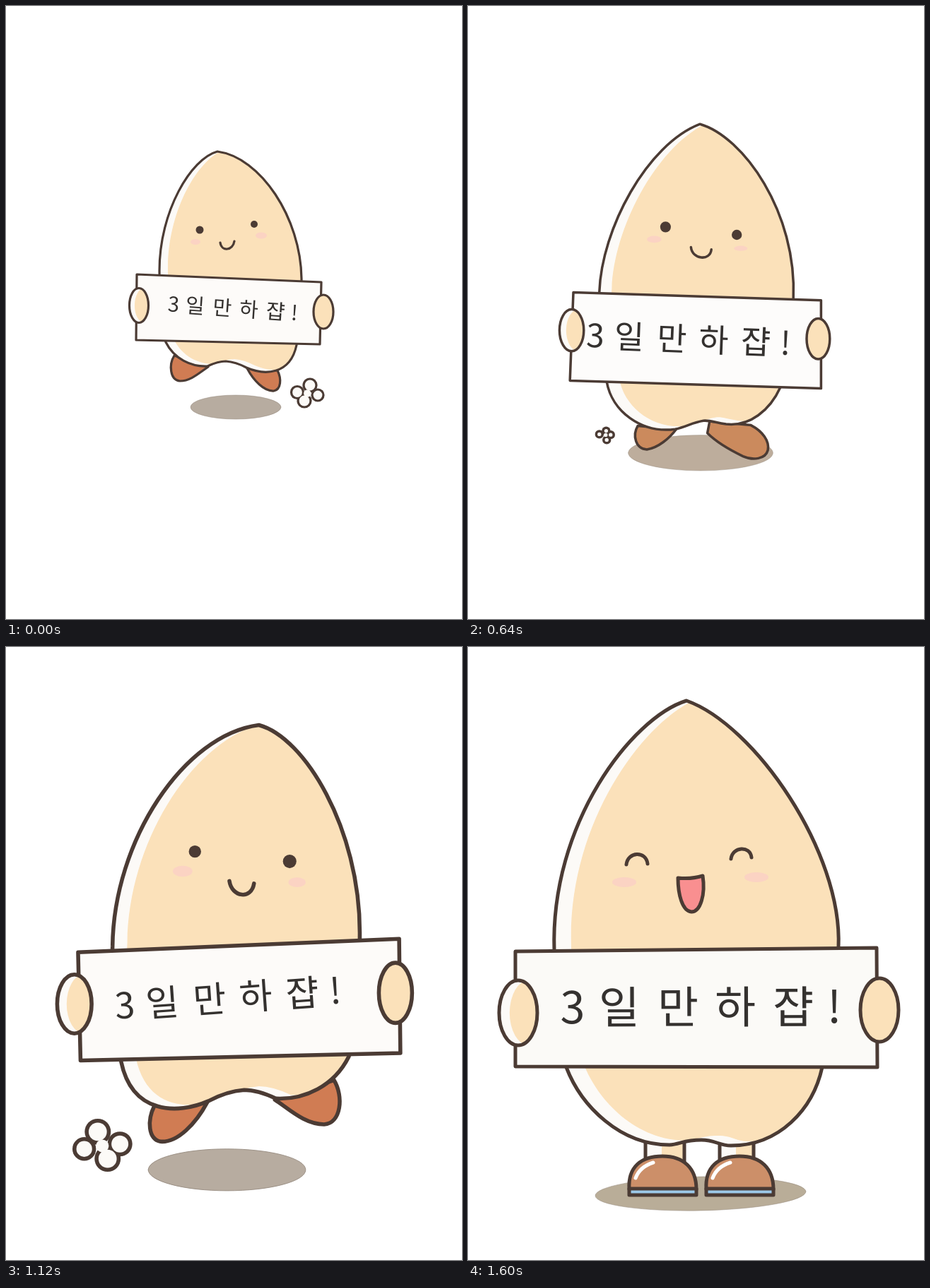
Write an HTML page with a canvas that moves like this. It is 645 px wide and 868 px high and loops after 1920 ms.

```html
<!DOCTYPE html>
<html lang="ko">
<head>
<meta charset="utf-8">
<style>
html, body { margin: 0; width: 100%; height: 100%; overflow: hidden; background: #fff; }
canvas { display: block; }
</style>
</head>
<body>
<canvas id="stage" width="645" height="868"></canvas>
<script>
const ctx = document.getElementById('stage').getContext('2d');
const INK = '#4b3b34', SKIN = '#fbe1ba', SHINE = '#fcfaf7', LOOP = 1920;
const GLYPHS = [['3', 0], ['일', .178], ['만', .403], ['하', .622], ['쟙', .844], ['!', 1]];

// Ellipses: x, y, rx, ry, rotation. Arcs: x1, y1, x2, y2, depth. Text: x1, y1, x2, y2.
const poses = {
  hop: {
    line: 3.2, shine: [12, -3], paper: '#fdfbf9', shade: '#b7aca0', shoe: '#d07c53',
    shadow: [325, 568, 64, 17],
    body: 'M299 206C262 216 217 290 217 375C217 430 222 465 226 476C238 500 262 511 285 510Q300 503 311 503Q325 504 340 512C365 523 402 523 411 480C418 440 419 410 418 386C417 300 360 214 299 206Z',
    feet: ['M238 495C230 508 232 530 246 531C262 531 275 518 286 511Z', 'M341 513C350 530 365 546 379 545C389 543 390 528 384 516Z'],
    sign: 'M185 380L446 391L444 479L184 473Z', text: [237, 422, 408, 434],
    hands: [[188, 424, 13.5, 24.5], [449, 433, 14, 24]],
    eyes: [[274, 317, 5.5], [351, 309, 5]], cheeks: [[268, 334, 7, 4], [361, 325, 8, 4.5]],
    mouth: [303, 335, 323, 333, 10],
    puff: [[430, 537, 9], [441, 551, 8], [422, 559, 9], [412, 547, 8.5]]
  },
  plant: {
    line: 3.2, shine: [13, -4], paper: '#fdfdfc', shade: '#bcad9b', shoe: '#ca8a5c',
    shadow: [302, 590, 94, 19.5],
    body: 'M313 188C262 203 196 290 196 400C196 450 203 492 214 514C228 545 262 560 290 553Q305 542 325 553C350 566 380 566 402 552C416 541 424 522 427 502C435 470 437 430 435 391C428 300 375 207 313 188Z',
    feet: ['M300 550C303 560 301 570 296 573C280 583 260 594 243 599C228 602 228 585 233 573C240 560 260 556 275 553Z', 'M339 562C345 572 358 581 372 585C388 586 396 572 392 560L380 555Z'],
    sign: 'M163 407L465 391L467 499L168 517Z', text: [206, 457, 430, 445],
    hands: [[169, 451, 15.5, 23], [469, 437, 14, 25]],
    eyes: [[265, 323, 6], [353, 314, 6]], cheeks: [[260, 340, 8, 3.5], [364, 329, 8.5, 4]],
    mouth: [297, 344, 321, 340, 11],
    puff: [[424, 558, 3.5], [428, 566, 3.5], [420, 571, 3.5], [415, 565, 3.5]]
  },
  kick: {
    line: 3.5, shine: [20, -6], paper: '#fefaf4', shade: '#b7aea3', shoe: '#c8885d',
    shadow: [302, 634, 91.5, 21.5, .03],
    body: 'M330 177C262 190 192 290 185 405C183 460 188 500 199 527C206 568 246 588 276 567Q296 549 322 557Q336 562 345 572C370 580 420 545 434 515C443 470 445 430 441 391C431 300 388 205 330 177Z',
    feet: ['M247 575C247 600 252 616 262 616C278 614 293 595 294 557Z'],
    sole: 'M343 583C343 556 375 525 405 523C424 522 432 533 429 547C424 577 395 598 368 601C350 602 343 595 343 583Z',
    sign: 'M147 408L469 390L475 509L154 528Z', text: [198, 465, 445, 449],
    hands: [[151, 466, 16.5, 31], [475, 446, 16, 30]],
    lids: [[262, 311, 283, 309, -7], [356, 314, 377, 314, -8]],
    cheeks: [[264, 329, 10, 4.5], [377, 332, 9, 4.5]],
    mouth: [308, 338, 332, 337, 9],
    puff: [[192, 591, 9.5], [207, 596, 7], [201, 608, 8.5]]
  },
  stride: {
    line: 4, shine: [16, -4], paper: '#fdfcfb', shade: '#bfae9b', shoe: '#ca875d',
    shadow: [339, 685, 109, 29, -.03],
    body: 'M309 130C258 143 178 270 175 393C170 460 172 520 184 542C200 570 260 615 292 601Q320 585 345 586Q358 588 370 601C390 619 425 622 446 598C458 583 462 570 465 556C480 500 484 450 481 405C483 300 395 140 309 130Z',
    feet: ['M352 588C352 625 365 661 388 661C403 658 416 638 413 617Z'],
    sole: 'M183 580C182 555 205 545 222 547C255 552 294 590 292 622C290 642 282 647 265 646C225 642 184 608 183 580Z',
    sign: 'M138 392L530 411L517 558L128 536Z', text: [190, 458, 483, 482],
    hands: [[129.5, 459, 20, 34, .14], [526, 481, 21.5, 34.5, .05]],
    eyes: [[257, 303, 9], [374, 292, 8.5]], cheeks: [[245, 326, 9, 4.5], [390, 310, 10, 4.5, -.14]],
    mouth: [305, 332, 332, 331, 11],
    puff: [[489, 635, 10.5], [470, 643, 7.5], [480, 653, 8]]
  },
  land: {
    line: 4.4, shine: [22, -6], paper: '#fdfcfb', shade: '#bdad9c', shoe: '#cb8a5d',
    shadow: [325, 706, 128, 31.5],
    body: 'M326 124C250 146 154 280 161 434C163 500 172 560 184 590C202 630 238 660 280 655C300 652 308 648 320 649C340 652 350 660 370 664C430 672 482 632 491 580C503 530 508 470 504 421C500 310 420 160 326 124Z',
    feet: ['M236 657C215 668 203 685 206 701C210 717 232 720 250 712C275 700 300 684 313 671L309 650Z', 'M368 664C380 680 400 697 420 700C440 699 446 675 436 658Z'],
    sign: 'M112 436L550 422L556 578L112 592Z', text: [175, 511, 511, 498],
    hands: [[117, 504, 20.5, 36], [553, 489, 21.5, 37]],
    eyes: [[261, 320, 9], [387, 306, 9.5]], cheeks: [[254, 344, 12, 4.5], [407, 328, 13, 6]],
    mouth: [306, 346, 342, 342, 16],
    puff: [[492, 667, 5.5], [504, 673, 5.5], [491, 683, 5.5], [484, 674, 5.5]]
  },
  leap: {
    line: 4.6, shine: [23, -6], paper: '#f6fafc', shade: '#bbae9e', shoe: '#ca885d',
    shadow: [306, 752, 130, 35, .07],
    body: 'M347 81C240 100 137 235 137 418C134 490 142 560 158 597C166 652 236 692 280 645C300 634 340 640 362 656C420 660 480 610 498 575C512 520 514 450 510 398C497 290 430 115 347 81Z',
    feet: ['M221 668C222 690 236 716 260 721C280 715 292 675 292 640Z'],
    sole: 'M363 665C364 625 410 588 455 585C485 584 498 605 495 630C490 670 445 705 405 706C375 706 362 690 363 665Z',
    sign: 'M78 423L552 397L562 570L88 599Z', text: [159, 504, 519, 474],
    hands: [[86, 502, 24.5, 41, -.07], [563, 477, 27.5, 41.5]],
    eyes: [[266, 272, 10.5], [403, 285, 10]], cheeks: [[256, 305, 15, 6.5, .14], [413, 314, 13, 6]],
    mouth: [318, 314, 351, 317, 10],
    puff: [[138, 701, 20.5], [167, 710, 12.5], [148, 729, 17.5]]
  },
  stand: {
    line: 5, shine: [24, -6], paper: '#fbfaf7', shade: '#b9ad98', shoe: '#cc8f69',
    shadow: [329, 774, 149, 24, -.02],
    body: 'M309 76C232 100 116 250 122 430C123 500 130 560 139 595C160 650 215 705 285 705C300 704 305 698 330 698C350 698 355 706 372 706C440 706 488 655 501 595C520 540 526 480 524 425C530 290 405 110 309 76Z',
    feet: [], shoes: [[251, 55, 228], [356, 48, 337]],
    sign: 'M67 431L578 426L579 595L67 594Z', text: [148, 510, 518, 509],
    hands: [[71, 518, 27, 46], [582, 514, 27, 45]],
    lids: [[224, 308, 254, 307, -14], [372, 300, 401, 298, -13]],
    cheeks: [[221, 333, 17, 7], [408, 326, 17, 7]],
    tongue: 'M297 327Q316 329 332 324C336 350 329 375 316 375C303 374 297 350 297 327Z',
    puff: []
  }
};

// Start time, pose, scale, x, y, facing
const timeline = [
  [0, 'hop', 1, 0, 0, 1],
  [80, 'stride', .713, 83, 97, 1],
  [240, 'plant', 1, 0, 0, 1],
  [400, 'hop', 1.2, 695, -41, -1],
  [480, 'kick', 1, 0, 0, 1],
  [640, 'land', .8, 589, 68, -1],
  [720, 'hop', 1.38, -117, -117, 1],
  [800, 'stride', 1, 0, 0, 1],
  [960, 'land', 1, 0, 0, 1],
  [1120, 'hop', 1.74, 878, -248, -1],
  [1200, 'leap', 1, 0, 0, 1],
  [1280, 'land', 1.12, 700, -45, -1],
  [1360, 'hop', 1.9, -279, -312, 1],
  [1440, 'stride', 1.24, -98, -86, 1],
  [1520, 'land', 1.17, -66, -64, 1],
  [1600, 'stand', 1, 0, 0, 1]
];

function paint(path, fill, stroke = INK) {
  if (fill) { ctx.fillStyle = fill; ctx.fill(path); }
  if (stroke) { ctx.strokeStyle = stroke; ctx.stroke(path); }
}

function oval([x, y, rx, ry = rx, turn = 0]) {
  const path = new Path2D();
  path.ellipse(x, y, rx, ry, turn, 0, 7);
  return path;
}

function arc([x1, y1, x2, y2, depth]) {
  const d = depth * 4 / 3;
  paint(new Path2D(`M${x1} ${y1}C${x1 + 2} ${y1 + d} ${x2 - 2} ${y2 + d} ${x2} ${y2}`));
}

// A pale shape with its shifted copy in skin colour, leaving a lit edge
function lit(path, dx, dy) {
  paint(path, SHINE, null);
  ctx.save();
  ctx.clip(path);
  ctx.translate(dx, dy);
  paint(path, SKIN, null);
  ctx.restore();
  paint(path);
}

function drawShoe([legX, legW, x], p) {
  const leg = new Path2D();
  leg.rect(legX, 690, legW, 45);
  lit(leg, 23, 0);
  paint(new Path2D(`M${x} 768C${x - 2} 736 ${x + 17} 721 ${x + 47} 721C${x + 77} 721 ${x + 95} 738 ${x + 95} 768Z`), p.shoe);
  paint(new Path2D(`M${x} 767h95v9h-95Z`), '#9cc8e8');
  paint(new Path2D(`M${x + 9} 752Q${x + 15} 736 ${x + 34} 730`), null, '#fff');
}

function drawFace(p) {
  p.cheeks.forEach(c => paint(oval(c), '#fbd3c3', null));
  (p.eyes || []).forEach(e => paint(oval(e), INK, null));
  (p.lids || []).forEach(arc);
  if (p.mouth) arc(p.mouth);
  if (p.tongue) paint(new Path2D(p.tongue), '#f98f90');
}

function drawText([x1, y1, x2, y2], facing) {
  const dx = x2 - x1, dy = y2 - y1, size = Math.hypot(dx, dy) * .17;
  ctx.font = `500 ${size}px "Noto Sans CJK KR", "Noto Sans CJK", "Noto Sans KR", sans-serif`;
  ctx.textAlign = 'center';
  ctx.fillStyle = '#34312f';
  for (const [glyph, at] of GLYPHS) {
    const k = facing > 0 ? at : 1 - at;
    ctx.save();
    ctx.translate(x1 + dx * k, y1 + dy * k);
    ctx.scale(facing, 1);
    ctx.rotate(Math.atan2(dy, dx) * facing);
    ctx.fillText(glyph, 0, size * .37);
    ctx.restore();
  }
}

function drawPuff(p) {
  const grow = (d, color) => p.puff.forEach(([x, y, r]) => paint(oval([x, y, r + d]), color, null));
  grow(p.line / 2, INK);
  grow(-p.line / 2, SHINE);
  if (p.puff.length) {
    const mean = i => p.puff.reduce((sum, c) => sum + c[i], 0) / p.puff.length;
    paint(oval([mean(0), mean(1), mean(2) * .6]), SHINE, null);
  }
}

function draw([, name, scale, x, y, facing]) {
  const p = poses[name];
  ctx.setTransform(1, 0, 0, 1, 0, 0);
  ctx.fillStyle = '#fff';
  ctx.fillRect(0, 0, 645, 868);
  ctx.setTransform(scale * facing, 0, 0, scale, x, y);
  ctx.lineCap = ctx.lineJoin = 'round';

  ctx.lineWidth = .5;
  paint(oval(p.shadow), p.shade, '#94897d');
  ctx.lineWidth = p.line;
  p.feet.forEach(f => paint(new Path2D(f), p.shoe));
  (p.shoes || []).forEach(s => drawShoe(s, p));
  lit(new Path2D(p.body), p.shine[0] * facing, p.shine[1]);
  if (p.sole) paint(new Path2D(p.sole), '#b79b80');
  drawFace(p);
  paint(new Path2D(p.sign), p.paper);
  drawText(p.text, facing);
  p.hands.forEach((h, i) => {
    const left = (i === 0) === (facing > 0);
    lit(oval(h), left ? h[2] * .55 * facing : 0, 0);
  });
  drawPuff(p);
}

function tick(now) {
  const t = now % LOOP;
  draw(timeline.findLast(step => step[0] <= t));
  requestAnimationFrame(tick);
}

const start = performance.now();
const run = now => tick(Math.max(0, now - start));
requestAnimationFrame(function loop(now) {
  draw(timeline.findLast(step => step[0] <= Math.max(0, now - start) % LOOP));
  requestAnimationFrame(loop);
});
</script>
</body>
</html>
```
